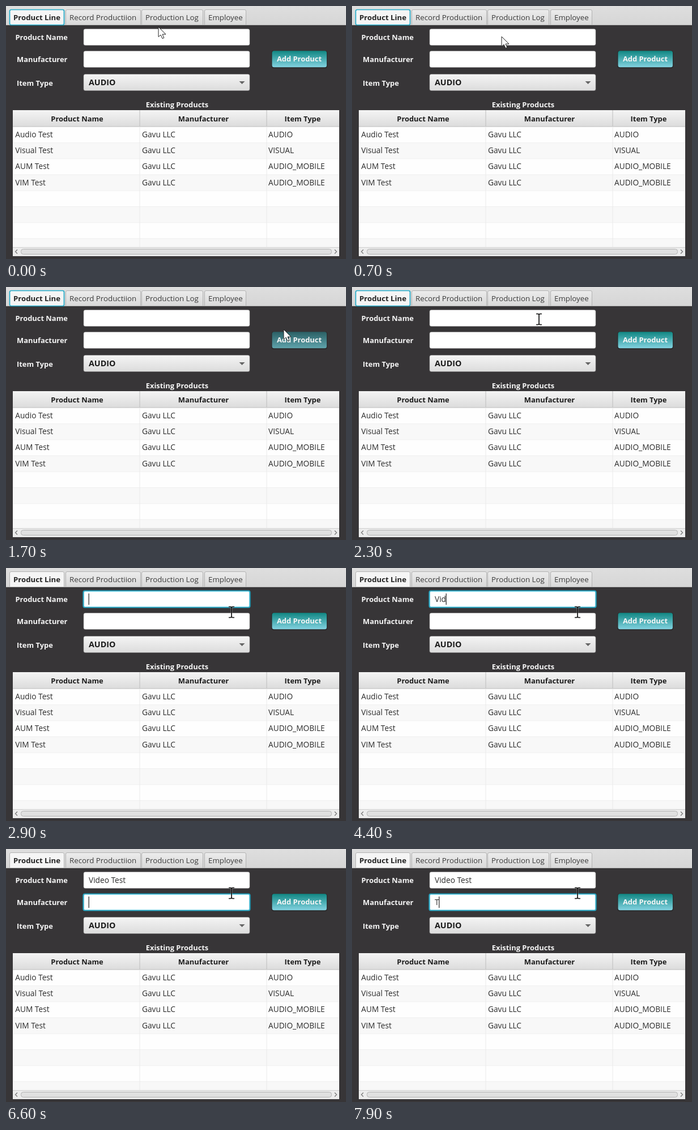
Animation, 600 px wide and 447 px high, one loop 8 s. Source, as an HTML page:

```html
<!DOCTYPE html>
<html lang="en">
<head>
<meta charset="utf-8">
<title>Product form</title>
<style>
  html, body { margin: 0; width: 100%; height: 100%; overflow: hidden; background: #373537; }
  svg { display: block; width: 600px; height: 447px; }
  text { font: 13.7px "Open Sans", "Noto Sans", sans-serif; fill: #2b2b2b; white-space: pre; }
  .tab { font-size: 13.3px; fill: #3c3c3c; }
  .bold { font-weight: 700; font-size: 12.9px; fill: #1c1c1c; }
  .active { font-size: 13.2px; fill: #222; }
  .label { fill: #f6f6f6; }
  .combo { font-size: 14.3px; }
  .mid { text-anchor: middle; }
</style>
</head>
<body>
<svg id="stage" viewBox="0 0 600 447">
  <defs>
    <linearGradient id="bar" x2="0" y2="1"><stop stop-color="#dedede"/><stop offset="1" stop-color="#d6d6d6"/></linearGradient>
    <linearGradient id="tabFill" x2="0" y2="1"><stop stop-color="#ececec"/><stop offset="1" stop-color="#d9d9d9"/></linearGradient>
    <linearGradient id="head" x2="0" y2="1"><stop stop-color="#f4f4f4"/><stop offset="1" stop-color="#dcdcdc"/></linearGradient>
    <linearGradient id="button" x2="0" y2="1"><stop stop-color="#118783"/><stop offset="1" stop-color="#82d2e0"/></linearGradient>
    <linearGradient id="buttonHover" x2="0" y2="1"><stop stop-color="#2b6065"/><stop offset="1" stop-color="#5fa3ab"/></linearGradient>
  </defs>
  <g id="scene"></g>
  <g id="focus" fill="none" stroke="#23abc9">
    <rect id="glow" stroke-width="3.4" stroke-opacity=".25" rx="3"/>
    <rect id="ring" stroke-width="1.7" rx="2.5"/>
  </g>
  <text id="product" x="146" y="60"></text>
  <text id="maker" x="146" y="98.5"></text>
  <rect id="caret" fill="#222"/>
  <path id="arrow" d="M0 0V17.5L4 14L7 20.5L9.8 19.2L7 13H13Z" fill="#fff" stroke="#222" stroke-linejoin="round"/>
  <g id="beam" fill="none">
    <path d="M-5 -9.5H-1.5L0 -8.5L1.5 -9.5H5M0 -8.5V8.5M-5 9.5H-1.5L0 8.5L1.5 9.5H5" stroke="#fff" stroke-opacity=".4" stroke-width="3"/>
    <path d="M-5 -9.5H-1.5L0 -8.5L1.5 -9.5H5M0 -8.5V8.5M-5 9.5H-1.5L0 8.5L1.5 9.5H5" stroke="#111" stroke-width="1.7"/>
  </g>
</svg>
<script>
const LOOP = 8000, STEP = 100;
const $ = id => document.getElementById(id);

const rect = (x, y, w, h, fill, extra = "") =>
  `<rect x="${x}" y="${y}" width="${w}" height="${h}" fill="${fill}" ${extra}/>`;
const text = (x, y, s, cls = "") => `<text x="${x}" y="${y}" class="${cls}">${s}</text>`;

function tabs() {
  const tab = (x, w, name, cls, fill) =>
    `<path d="M${x + .5} 33V9q0-2.5 2.5-2.5H${x + w - 3}q2.5 0 2.5 2.5V33" fill="${fill}" stroke="#b2b2b2"/>` +
    text(x + 7, 25, name, cls);
  return rect(0, 0, 600, 33, "url(#bar)") + rect(0, 33, 600, 1, "#b4b4b4") +
    tab(6, 97, "Product Line", "bold active", "#f5f5f5") +
    tab(105, 133, "Record Productiion", "tab", "url(#tabFill)") +
    tab(239, 109, "Production Log", "tab", "url(#tabFill)") +
    tab(350, 74, "Employee", "tab", "url(#tabFill)");
}

function form() {
  const box = (y, fill) => rect(136.5, y, 294, 30, "#8f8f8f", 'rx="3.5" opacity=".6"') +
    rect(137.2, y + .8, 292.6, 28.4, fill, 'rx="3"');
  return text(16.5, 60, "Product Name", "bold label") +
    text(19, 99, "Manufacturer", "bold label") +
    text(19, 141, "Item Type", "bold label") +
    box(40, "#fff") + box(79, "#fff") + box(120, "url(#head)") +
    text(146, 140, "AUDIO", "bold combo") +
    '<path d="M411.5 133H421.5L416.5 138Z" fill="#666"/>' +
    rect(468.5, 79, 98.5, 31, "#111", 'rx="4" opacity=".35"') +
    rect(469.5, 79.2, 96.5, 29, "url(#button)", 'id="add" rx="3.5"') +
    text(517.5, 98, "Add Product", "bold label mid") +
    text(302, 179, "Existing Products", "bold label mid");
}

function table() {
  const top = 213, rowH = 28.2, bottom = 426;
  const rows = [["Audio Test", "AUDIO"], ["Visual Test", "VISUAL"],
    ["AUM Test", "AUDIO_MOBILE"], ["VIM Test", "AUDIO_MOBILE"]];
  let out = rect(12, 184, 576, 258, "#fff");
  for (let i = 0; i < 8; i++) {
    const y = top + i * rowH;
    out += rect(12, y, 576, Math.min(rowH, bottom - y), i % 2 ? "#f8f8f8" : "#fefefe") +
      rect(12, y, 576, 1, "#efefef");
    if (rows[i]) out += text(16.3, y + 19, rows[i][0]) +
      text(240, y + 19, "Gavu LLC") + text(463, y + 19, rows[i][1]);
  }
  out += rect(12, 184, 576, 29, "url(#head)") + rect(12, 212.5, 576, 1, "#c4c4c4");
  for (const x of [235.5, 459.5])
    out += rect(x, 184, 1, 29, "#bdbdbd") + rect(x, 213.5, 1, bottom - 213.5, "#e9e9e9");
  out += text(125.5, 204, "Product Name", "bold mid") +
    text(348.5, 204, "Manufacturer", "bold mid") + text(523.5, 204, "Item Type", "bold mid");
  return out + rect(12, bottom, 576, 16, "#ececec") + rect(12, bottom, 576, 1, "#d0d0d0") +
    rect(26.5, 429.5, 548, 9, "#e0e0e0", 'rx="4" stroke="#b2b2b2"') +
    '<path d="M20 430.5L16.5 434L20 437.5M580 430.5L583.5 434L580 437.5" fill="none" stroke="#777" stroke-width="1.3"/>';
}

$("scene").innerHTML = tabs() + form() + table();

// Pointer stops: time, x, y
const path = [[0, 269, 37], [700, 264, 54], [900, 268, 56], [1300, 500, 88], [1500, 500, 88],
  [1700, 490, 75], [2200, 330, 57], [2500, 330, 57], [2900, 398, 78]];
const BEAM_AT = 2000, CLICK = 2500, TAB_KEY = 6200;
const productKeys = [4100, 4200, 4400, 4600, 4700, 5000, 5500, 5700, 5800, 5900];
const makerKeys = [7700];

const typed = (word, keys, t) => word.slice(0, keys.filter(k => k <= t).length);

function pointer(t) {
  const i = path.findIndex(p => p[0] > t);
  if (i < 0) return path[path.length - 1].slice(1);
  const [t0, x0, y0] = path[i - 1], [t1, x1, y1] = path[i];
  const u = (t - t0) / (t1 - t0), k = u * u * (3 - 2 * u);
  return [x0 + (x1 - x0) * k, y0 + (y1 - y0) * k];
}

function frame(el, x, y, width, height) {
  for (const [k, v] of Object.entries({ x, y, width, height })) el.setAttribute(k, v);
}

function draw(time) {
  const t = Math.floor(time % LOOP / STEP) * STEP;
  const [x, y] = pointer(t);
  const isBeam = t >= BEAM_AT;
  $("arrow").style.display = isBeam ? "none" : "";
  $("beam").style.display = isBeam ? "" : "none";
  $(isBeam ? "beam" : "arrow").setAttribute("transform", `translate(${x} ${y})`);

  const hover = x > 469 && x < 566 && y > 72 && y < 109;
  $("add").setAttribute("fill", hover ? "url(#buttonHover)" : "url(#button)");

  $("product").textContent = typed("Video Test", productKeys, t);
  $("maker").textContent = typed("T", makerKeys, t);

  const inForm = t >= CLICK, second = t >= TAB_KEY;
  const box = !inForm ? [6.5, 6.5, 96, 27] : [136.5, second ? 79.5 : 40.5, 294, 29];
  frame($("ring"), ...box);
  frame($("glow"), ...box);
  $("glow").style.display = inForm ? "" : "none";

  // The caret blinks every half second, counted from the last key or click.
  const last = Math.max(...[CLICK, TAB_KEY, ...productKeys, ...makerKeys].filter(k => k <= t));
  const shown = inForm && Math.floor((t - last) / 500) % 2 === 0;
  const field = $(second ? "maker" : "product");
  $("caret").style.display = shown ? "" : "none";
  frame($("caret"), 145.6 + field.getComputedTextLength(), second ? 84 : 45, 1.2, 20);
}

const start = performance.now();
function tick() {
  draw(performance.now() - start);
  requestAnimationFrame(tick);
}
tick();
</script>
</body>
</html>
```
